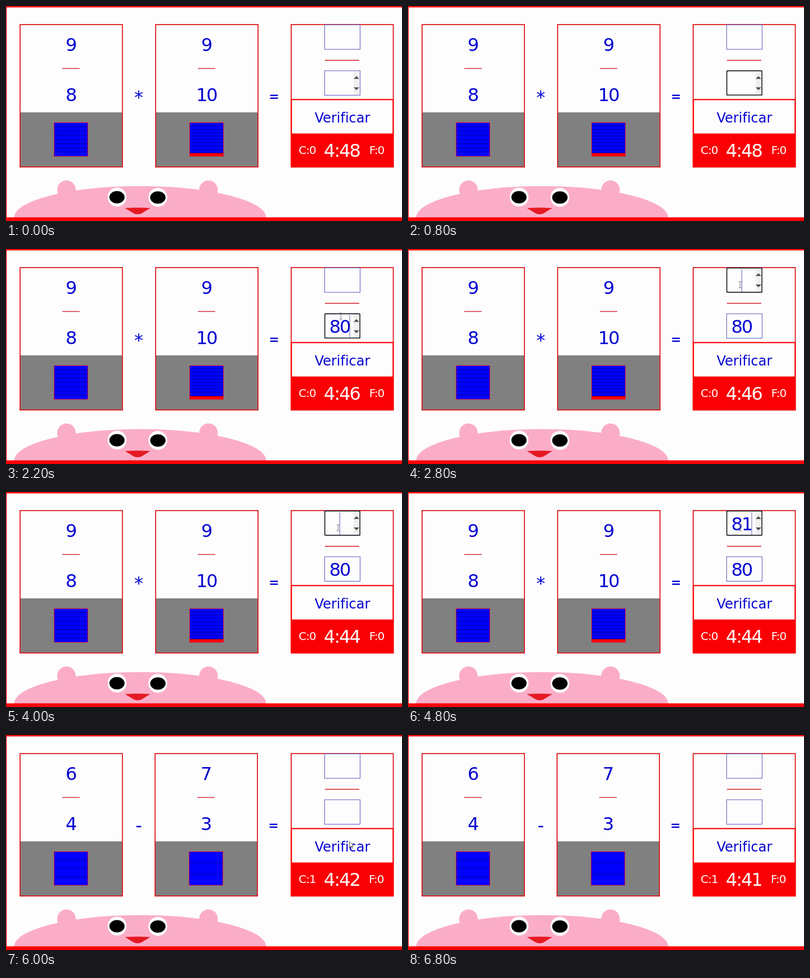
Animation of 704x382 px, one loop 7200 ms. Source, as an HTML page:

```html
<!DOCTYPE html>
<html lang="es">
<head>
<meta charset="utf-8">
<title>Fracciones</title>
<style>
  html, body { margin: 0; width: 100%; height: 100%; overflow: hidden; background: #fdfdfd; }
  svg { display: block; width: 100vw; height: 100vh; }
  text { font-family: "DejaVu Sans", Verdana, sans-serif; text-anchor: middle; fill: #0404d2; }
  .big { font-size: 32px; letter-spacing: -2px; }
  .small { font-size: 20px; letter-spacing: -1px; }
  .label { font-size: 24px; }
  .equals { font-size: 22px; font-weight: bold; }
  .white { fill: #fff; }
  .box { fill: none; stroke: #de0e12; stroke-width: 1.7; }
  .bar { stroke: #d01822; stroke-width: 1.3; }
  .slice { stroke: #00009c; stroke-width: 1; }
  .frame { fill: #fdfdfd; stroke: #5a5abe; stroke-width: 1; }
  .ring { fill: none; stroke: #181818; stroke-width: 1.5; }
  .caret { stroke: #6464b4; stroke-width: 1; }
</style>
</head>
<body>
<svg viewBox="0 0 704 382" preserveAspectRatio="none">
  <rect width="704" height="382" fill="#fdfdfd"/>

  <g fill="#fbadc8">
    <rect x="91" y="310" width="33" height="34" rx="16.5"/>
    <rect x="343.5" y="310" width="33" height="34" rx="16.5"/>
    <ellipse cx="238.5" cy="376" rx="224" ry="56"/>
  </g>
  <g fill="#fdfdfd">
    <circle cx="197.5" cy="339.5" r="16.8"/>
    <circle cx="270" cy="340" r="16.8"/>
  </g>
  <ellipse cx="197.3" cy="339.7" rx="13.5" ry="11"/>
  <ellipse cx="270" cy="340.2" rx="13.7" ry="11"/>
  <path d="M211.5 359Q234 357.5 256.5 359L241 368.5Q234 371.5 227 368.5Z" fill="#e51a22"/>

  <path d="M0 0H704V2.6H1.2V375.6H704V382H0Z" fill="#fa0004"/>

  <g id="problems"></g>

  <rect x="507" y="33" width="181.5" height="253" class="box"/>
  <path d="M567 96.5H628" class="bar"/>
  <g id="fields"></g>
  <rect x="506" y="165.2" width="183.3" height="121.6" fill="#fa0004"/>
  <rect x="508.3" y="167.3" width="178.9" height="59.2" fill="#fdfdfd"/>
  <text x="598" y="207" class="label">Verificar</text>
  <text id="right" x="535.5" y="263" class="small white"></text>
  <text id="clock" x="597" y="268" class="big white"></text>
  <text id="wrong" x="659" y="263" class="small white">F:0</text>

  <g id="pointer">
    <path id="beam" d="M-2.5 -5.5H-.6L0 -5L.6 -5.5H2.5M0 -5V5M-2.5 5.5H-.6L0 5L.6 5.5H2.5" fill="none" stroke="#70707a"/>
    <path id="arrow" d="M0 0V11L2.6 8.6L4.4 12.4L6 11.6L4.3 8H7.8Z" fill="#fff" stroke="#444" stroke-width=".9"/>
  </g>
</svg>

<script>
const LOOP = 7200, SOLVED = 5700;
const $ = id => document.getElementById(id);

function add(parent, tag, attrs, text = "") {
  const el = document.createElementNS("http://www.w3.org/2000/svg", tag);
  for (const k in attrs) el.setAttribute(k, attrs[k]);
  el.textContent = text;
  return parent.appendChild(el);
}
const show = (el, on) => { el.style.display = on ? "" : "none"; };

function panel(parent, x, num, den) {
  const mid = x + 90.5, left = mid - 30, step = 60 / den;
  const filled = step * Math.min(num, den);
  add(parent, "rect", { x, y: 189, width: 182, height: 97, fill: "#808080" });
  add(parent, "rect", { x, y: 33, width: 182, height: 253, class: "box" });
  add(parent, "text", { x: mid - .2, y: 80, class: "big" }, num);
  add(parent, "path", { d: `M${mid - 15.5} 111H${mid + 15.5}`, class: "bar" });
  add(parent, "text", { x: mid - .2, y: 169, class: "big" }, den);
  add(parent, "rect", { x: left, y: 207, width: 60, height: 60, fill: "#fe0000" });
  add(parent, "rect", { x: left, y: 207, width: 60, height: filled, fill: "#0000fe" });
  for (let i = 1; i < den; i++)
    add(parent, "path", { d: `M${left} ${207 + i * step}h60`, class: "slice" });
  add(parent, "rect", { x: left, y: 207.3, width: 60, height: 59.7, fill: "none", stroke: "#d8103c" });
}

function problem(a, op, b, shift) {
  const g = add($("problems"), "g", {});
  panel(g, 25, ...a);
  panel(g, 266 - shift, ...b);
  add(g, "text", { x: 235, y: op === "*" ? 173 : 172, class: "big" }, op);
  add(g, "text", { x: 476.5 - shift, y: 168, class: "equals" }, "=");
  return g;
}

function field(y) {
  const g = add($("fields"), "g", { transform: `translate(566 ${y})` });
  add(g, "rect", { x: .5, y: .5, width: 63, height: 43.5, class: "frame" });
  const text = add(g, "text", { x: 27, y: 34.5, class: "big" });
  const spin = add(g, "g", {});
  add(spin, "rect", { x: 52, y: 2, width: 10.5, height: 41, fill: "#f0f0f0" });
  add(spin, "path", { d: "M52 15L57 10L62 15ZM52 30H62L57 35Z", fill: "#505050" });
  const ring = add(g, "rect", { x: .8, y: .8, width: 62.4, height: 43, rx: 2, class: "ring" });
  const caret = add(g, "path", { d: "M0 3V43", class: "caret" });
  const contains = p => p.x > 566 && p.x < 630 && p.y > y && p.y < y + 45;
  function update(value, focused, hovered, blink) {
    text.textContent = value;
    show(ring, focused);
    show(spin, focused || hovered);
    show(caret, focused && blink);
    caret.setAttribute("transform", `translate(${27.5 + value.length * 8.8})`);
  }
  return { contains, update };
}

const first = problem([9, 8], "*", [9, 10], 0);
const second = problem([6, 4], "-", [7, 3], 1);
const upper = field(33), lower = field(114.5);

// Times at which the countdown drops by one second
const ticks = [1000, 2000, 3000, 4000, 4900, 5900, 6800];
const within = (t, spans) => spans.some(([a, b]) => t >= a && t < b);
const caretOn = [[200, 700], [1400, 2300], [2800, 3300], [4000, 5100]];
const pointerOn = [[2000, 4100], [4800, 6400]];
const typed = (t, keys) => t >= SOLVED ? "" : keys.filter(k => t >= k[0]).map(k => k[1]).join("");

const moves = [
  { from: 2000, to: 2600, a: [597, 139], b: [590.5, 63.5] },
  { from: 4800, to: 5300, a: [590.5, 63.5], b: [610.5, 189] }
];
function pointerAt(t) {
  const m = t < moves[1].from ? moves[0] : moves[1];
  const u = Math.min(1, Math.max(0, (t - m.from) / (m.to - m.from)));
  const e = u * u * (3 - 2 * u);
  return { x: m.a[0] + (m.b[0] - m.a[0]) * e, y: m.a[1] + (m.b[1] - m.a[1]) * e };
}

function render(t) {
  const solved = t >= SOLVED, p = pointerAt(t), blink = within(t, caretOn);
  const overUpper = upper.contains(p), overLower = lower.contains(p);
  show(first, !solved);
  show(second, solved);
  lower.update(typed(t, [[1400, "8"], [1800, "0"]]), t >= 200 && t < 2800, overLower, blink);
  upper.update(typed(t, [[4100, "8"], [4600, "1"]]), t >= 2800 && !solved, overUpper, blink);
  $("right").textContent = solved ? "C:1" : "C:0";
  $("wrong").setAttribute("x", solved ? 658.3 : 659);
  $("clock").textContent = "4:" + (48 - ticks.filter(k => t >= k).length);
  show($("pointer"), within(t, pointerOn));
  show($("beam"), overUpper || overLower);
  show($("arrow"), !overUpper && !overLower);
  $("pointer").setAttribute("transform", `translate(${p.x} ${p.y})`);
}

const start = performance.now();
function loop() {
  render((performance.now() - start) % LOOP);
  requestAnimationFrame(loop);
}
loop();
</script>
</body>
</html>
```
